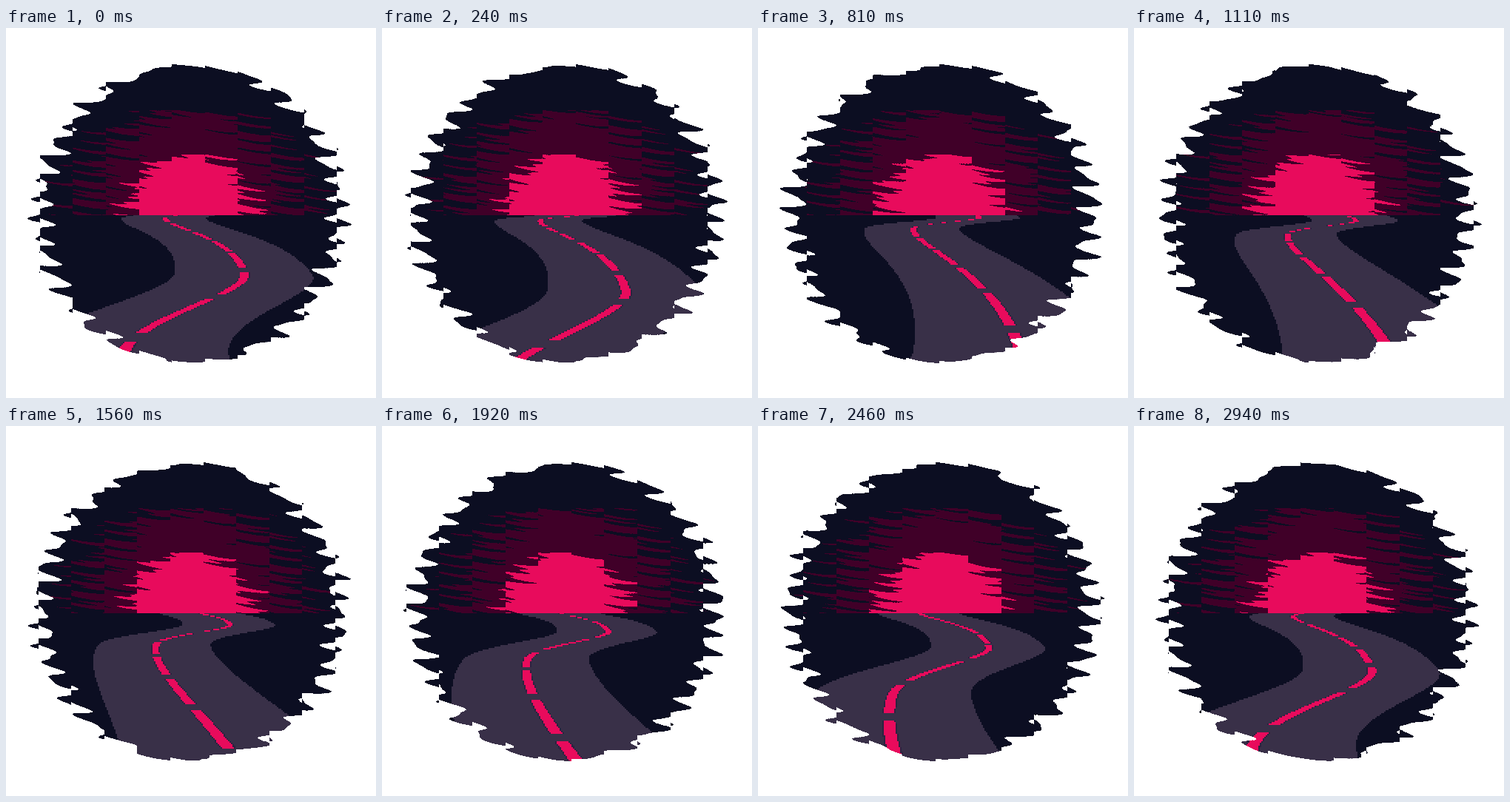
An HTML page with a canvas for the animation above (2.97 s loop, 500 px wide and 500 px high).

```html
<!DOCTYPE html>
<html lang="en">
<head>
<meta charset="utf-8">
<title>Night road</title>
<style>
  html, body { margin: 0; width: 100%; height: 100%; overflow: hidden; background: #fff; }
  canvas { display: block; width: 500px; height: 500px; }
</style>
</head>
<body>
<canvas id="stage" width="500" height="500"></canvas>
<script>
const SIZE = 500, FRAMES = 99, STEP = 30;
const HORIZON = 253, MID = 248, TILE = 44.6, CELL = 2;
const TAU = Math.PI * 2;

const ctx = document.getElementById('stage').getContext('2d');
const image = ctx.createImageData(SIZE, SIZE);
const pixels = new Uint32Array(image.data.buffer);

const color = hex => (0xff000000 | (hex & 255) << 16 | (hex & 0xff00) | hex >> 16) >>> 0;
const WHITE = color(0xffffff), NIGHT = color(0x0c0e22), GLOW = color(0x400028),
      SUN = color(0xe80b5c), ROAD = color(0x393048), RIM = color(0x2c2340);

const mod = (a, n) => ((a % n) + n) % n;

// Repeating sideways shift by height; parts are [cycles, amplitude, phase].
function ripple(period, peak, parts) {
  const table = Float32Array.from({ length: period * 4 }, (_, i) =>
    parts.reduce((sum, [k, a, ph]) =>
      sum + a * Math.cos(TAU * k * (i / 4 - peak) / period + ph), 0));
  return v => table[Math.floor(mod(v, period) * 4)];
}

const edgeShift = ripple(400, 241, [[16, 13, 0], [11, 4, 1], [29, 5, 2.2]]);
const skyShift = ripple(99, 231, [[7, 12, 0], [16, 8, 0.8], [4, 6, 2]]);

// Road centre swings between a long right drift and a short left return.
const CYCLE = 3.12, RISE = 2.24, FALL = CYCLE - RISE;
function swing(w, frame) {
  const q = Math.log(w + 6 * Math.exp(-w / 15));
  const p = mod(q - CYCLE * frame / FRAMES - 2.12, CYCLE);
  return p < RISE ? -Math.cos(Math.PI * p / RISE)
                  : Math.cos(Math.PI * (p - RISE) / FALL);
}

function roadRow(y, frame) {
  const w = Math.max(1, (Math.floor(y / CELL) + 0.5) * CELL - HORIZON);
  const center = 257 + (41 + 0.31 * w) * swing(w, frame);
  const half = 53 + 0.48 * w;
  const dash = mod((Math.log(w) - 5.136) / 0.4 - 14 * frame / FRAMES, 1) < 0.84;
  return { center, left: center - half - 4, right: center + half, dash: dash ? half * 0.062 : 0 };
}

function roadColor(row, x) {
  const sx = (Math.floor(x / CELL) + 0.5) * CELL;
  const off = Math.abs(sx - row.center);
  if (off < row.dash) return SUN;
  if (off < row.dash * 1.25) return RIM;
  return sx > row.left && sx < row.right ? ROAD : NIGHT;
}

// Vertical glass-like strips slide left, two widths per loop.
function strips(frame) {
  const start = 90 - 2 * TILE * frame / FRAMES;
  return Array.from({ length: SIZE }, (_, x) => {
    const u = mod((x - start) / TILE, 1);
    const pull = TILE * (0.5 - u);
    return {
      bend: 6 * (Math.sin(u * Math.PI / 2) - 0.6),
      edgeX: x - MID + 0.06 * pull,
      skyX: x - MID + 0.35 * pull
    };
  });
}

function skyColor(col, y, frame) {
  const shift = skyShift(y - col.bend + frame);
  const dy2 = (y - HORIZON) ** 2;
  if ((col.skyX - shift) ** 2 + dy2 < 83 ** 2) return SUN;
  return (col.skyX - 2.6 * shift) ** 2 + dy2 < 143 ** 2 ? GLOW : NIGHT;
}

function draw(frame) {
  const cols = strips(frame);
  const rise = 400 * frame / FRAMES;
  pixels.fill(WHITE);
  for (let y = 46; y < 456; y++) {
    const row = y >= HORIZON ? roadRow(y, frame) : null;
    for (let x = 0; x < SIZE; x++) {
      const col = cols[x];
      const ex = col.edgeX - edgeShift(y - col.bend + rise);
      const ey = y - 250.5 - 0.5 * col.bend;
      if (ex * ex + ey * ey > 200.5 ** 2) continue;
      pixels[y * SIZE + x] = row ? roadColor(row, x) : skyColor(col, y, frame);
    }
  }
  ctx.putImageData(image, 0, 0);
}

const began = performance.now();
let shown = -1;
function tick() {
  const frame = Math.floor((performance.now() - began) / STEP) % FRAMES;
  if (frame !== shown) draw(shown = frame);
  requestAnimationFrame(tick);
}
tick();
</script>
</body>
</html>
```
